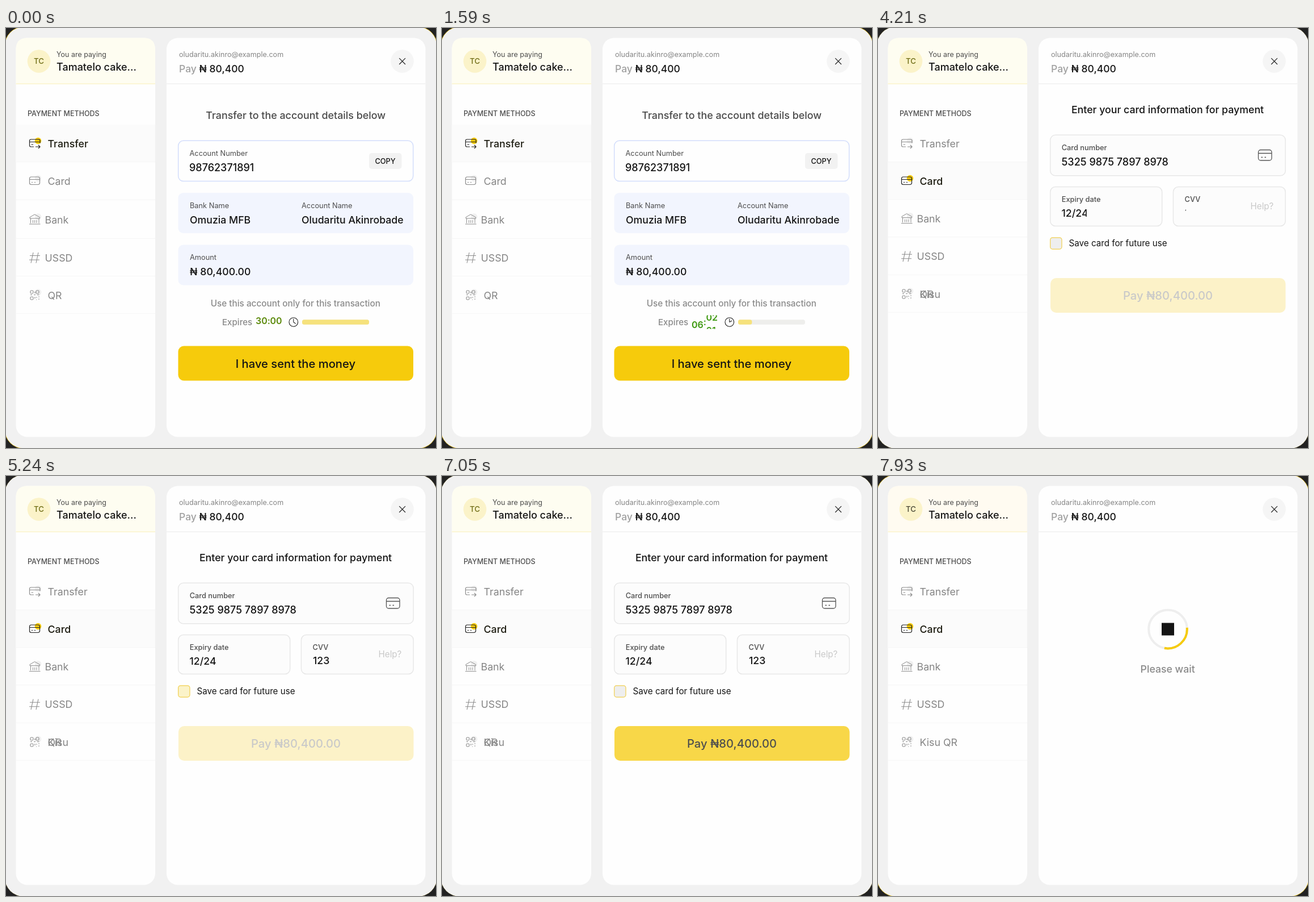
An HTML page for the animation above (8000 ms loop, 758 by 739 pixels).

```html
<!DOCTYPE html>
<html lang="en">
<head>
<meta charset="utf-8">
<title>Checkout</title>
<style>
html, body { margin: 0; width: 100%; height: 100%; overflow: hidden; background: #222; }
svg { display: block; width: 758px; height: 739px; font-family: Inter, sans-serif; }
</style>
</head>
<body>
<svg id="stage" viewBox="0 0 758 739"></svg>
<script>
const LOOP = 8000, CARD_AT = 3040, WAIT_AT = 7310;
const INK = '#141414', LABEL = '#4d4d4d', GREY = '#8a8a8a', YELLOW = '#f6cb0c', PITCH = 23.5;

const text = (x, y, str, size, fill, weight = 400, extra = '') =>
  `<text x="${x}" y="${y}" font-size="${size}" fill="${fill}" font-weight="${weight}" ${extra}>${str}</text>`;
const mid = (x, y, str, size, fill, weight, extra = '') =>
  text(x, y, str, size, fill, weight, `text-anchor="middle" ${extra}`);
const rect = (x, y, w, h, r, fill, extra = '') =>
  `<rect x="${x}" y="${y}" width="${w}" height="${h}" rx="${r}" fill="${fill}" ${extra}/>`;
const path = (d, stroke, width, extra = '') =>
  `<path d="${d}" fill="none" stroke="${stroke}" stroke-width="${width}" ${extra}/>`;
const circle = (x, y, r, fill, extra = '') => `<circle cx="${x}" cy="${y}" r="${r}" fill="${fill}" ${extra}/>`;
const outline = (color, width) => `stroke="${color}" stroke-width="${width}"`;
const group = (id, body) => `<g id="${id}">${body}</g>`;
const clip = (id, x, y, w, h) =>
  `<clipPath id="${id}"><rect id="${id}Box" x="${x}" y="${y}" width="${w}" height="${h}"/></clipPath>`;
const clipped = (id, body) => `<g clip-path="url(#${id})">${body}</g>`;
const line = (x1, x2, y, color, w = 1) => path(`M${x1} ${y}H${x2}`, color, w);

// Icons are drawn around their row's middle.
const icons = {
  Transfer: c => path('M49 5.5H44Q41.5 5.5 41.5 3V-5Q41.5 -7.5 44 -7.5H57.5Q60 -7.5 60 -5V-1M41.5 -3H60M44.5 1.5H48M52 5.5H60M57 2.5L60 5.5L57 8.5', c, 1.2),
  Card: c => rect(41.5, -7.5, 18, 13.5, 3, 'none', outline(c, 1.2)) +
    path('M41.5 -3H59.5M45 2H47M50 2H52', c, 1.2),
  Bank: c => path('M42 -4L50.5 -9L59.5 -4V-2H42ZM43.5 -2V6.5M47.5 1V6M50.7 1V6M54 1V6M58 -2V6.5M41 8H60.5', c, 1),
  USSD: c => path('M48 -9L44 9.5M57 -9L53 9.5M42 -3.5H60M41 4H59', c, 1.1),
  QR: c => [[43, -8], [53, -8], [43, 3]].map(([x, y]) =>
      rect(x, y, 5, 5, 1.5, 'none', outline(c, 1.1))).join('') +
    path('M43 -0.5H46M49 -0.5H52M55 -0.5H58.5M51 -6V-3M51 3V6M53 4H55M57 3H59M53 8H54M57 7H59', c, 1.1)
};

function row(name, y, active, label) {
  const x = name === 'Bank' || name === 'USSD' ? 68.5 : 73.5;
  const dot = name === 'USSD' ? '' : circle(56.5, -5, 5.8, active ? YELLOW : '#f0f0f0');
  return `<g transform="translate(0 ${y})">${dot}${icons[name](active ? '#222' : '#8c8c8c')}` +
    text(x, 6.7, label, 17.8, active ? '#1c1b10' : '#858585', active ? 500 : 400) + '</g>';
}

function menu(active, ys, lines, qr) {
  return rect(17.5, active === 'Transfer' ? 170 : 236, 245.5, 65.5, 0, '#fbfbfb') +
    lines.map(y => line(17.5, 263, y, '#f6f6f6')).join('') +
    Object.keys(icons).map((n, i) => row(n, ys[i], n === active, n === 'QR' ? qr : n)).join('');
}

const field = (x, y, w, h, label) =>
  rect(x, y, w, h, 9, '#fcfcfc', outline('#e8e8e8', 1.5)) +
  text(x + 20, y + 26.5, label, 12.8, LABEL, 500);

const pair = (x, y, label, value) =>
  text(x, y, label, 12.8, LABEL) + text(x, y + 27, value, 17.7, INK, 500);

const shell =
  rect(-2, -2, 761.5, 741.8, 33, '#f1f1f1', `id="frame" ${outline(YELLOW, 0.7)}`) +
  rect(17.5, 17.5, 245.5, 702, 20, '#fefefe') +
  '<path id="head" d="M17.5 98V37.5Q17.5 17.5 37.5 17.5H243Q263 17.5 263 37.5V98Z"/>' +
  line(17.5, 263, 98.2, '#fcf4cc', 1.5) +
  circle(58, 58.5, 20.3, '#fbf3c9') +
  mid(58, 63.3, 'TC', 13.3, '#6f6c14', 500, 'id="initials"') +
  text(89, 51, 'You are paying', 12.5, LABEL) +
  text(89, 75, 'Tamatelo cake...', 18, INK, 500) +
  text(38, 155, 'PAYMENT METHODS', 12.5, LABEL, 500) +
  rect(283, 17.5, 456.5, 702, 20, '#fefefe') +
  line(283, 739.5, 98.2, '#f1f1f1', 1.4) +
  text(305, 51, 'oludaritu.akinro@example.com', 12.6, '#858585') +
  text(305, 77.5, 'Pay', 17.5, '#a0a0a0', 500) +
  text(340.5, 77.5, '₦ 80,400', 17.5, INK, 500) +
  circle(698.5, 58.5, 20.3, '#f5f5f5') +
  path('M693.2 53.2L704 64M704 53.2L693.2 64', '#222', 1.2);

const transfer =
  rect(38, 237, 206, 63, 2, '#fcfcfc', 'id="hover"') +
  menu('Transfer', [203.5, 269.5, 337, 404, 470], [235.8, 302.3, 370.3, 436.5, 502.5], 'QR') +
  mid(510.7, 160, 'Transfer to the account details below', 17.9, '#4a4a4a', 500) +
  rect(303.7, 198.3, 414, 71.3, 9, '#fefefe', outline('#d3ddfb', 1.5)) +
  text(323.5, 225, 'Account Number', 12.8, LABEL) +
  text(323, 251.5, '98762371891', 18, INK, 500) +
  rect(640, 220, 57.5, 28, 5, '#f2f2f2') +
  mid(668.6, 239, 'COPY', 12.8, INK, 500) +
  rect(303.5, 290, 414.5, 71, 9, '#f2f5fe') +
  pair(324, 316.5, 'Bank Name', 'Omuzia MFB') +
  pair(521, 316.5, 'Account Name', 'Oludaritu Akinrobade') +
  rect(303.5, 381.5, 414.5, 71, 9, '#f2f5fe') +
  pair(324, 408.2, 'Amount', '₦ 80,400.00') +
  mid(510.3, 489.5, 'Use this account only for this transaction', 15.3, GREY, 500) +
  text(381, 522.5, 'Expires', 15.1, GREY, 500) +
  group('clock', clipped('digits', group('minutes', '') + group('seconds', '')) +
    text(460.7, 521, ':', 16, 'currentColor', 600, 'id="colon"')) +
  circle(506.8, 517.5, 7.8, '#fefefe', outline('#222', 1.1)) +
  path('M506.8 511.8V517.5', '#222', 1.1) +
  path('M506.8 517.5V512.5', '#222', 1.1, 'id="hand"') +
  rect(522, 513.2, 118, 8.6, 3.5, '#eeeeec') +
  rect(522, 513.2, 118, 8.6, 3.5, '#f6e27c', 'id="bar"') +
  rect(303.5, 559.5, 414.5, 61, 10, YELLOW) +
  mid(510.4, 597.7, 'I have sent the money', 20.2, INK, 500);

const cardRows = [203.5, 269.5, 335.7, 401.7, 468];
const cardLines = [235.8, 301.8, 367.8, 434.2, 500];

const card =
  menu('Card', cardRows, cardLines, 'QR') +
  text(73.5, 474.7, 'Kisu', 17.8, '#858585') +
  mid(510.5, 149.8, 'Enter your card information for payment', 17.75, INK, 500) +
  field(303.7, 188.3, 414.5, 71.5, 'Card number') +
  field(303.7, 279.5, 197, 69, 'Expiry date') +
  field(520.5, 279.5, 197.7, 69, 'CVV') +
  clipped('number', text(323.5, 241.5, '5325 9875 7897 8978', 18, INK, 500)) +
  clipped('expiry', text(323.5, 331.7, '12/24', 17.7, INK, 500)) +
  clipped('cvv', text(541, 330.7, '123', 17.7, INK, 500)) +
  rect(670.5, 214.5, 23.5, 18.5, 4, 'none', outline('#555', 1.3)) +
  path('M670.5 220.5H694M675.5 227.5H678M681.5 227.5H684', '#555', 1.3) +
  text(656.5, 319.2, 'Help?', 15.2, '#c9c9c9') +
  rect(303.7, 368.8, 20.3, 20.3, 4, '#eee', `id="check" ${outline('#f1cf50', 1.2)}`) +
  text(336.5, 384.2, 'Save card for future use', 15.2, INK) +
  group('pay', rect(304, 440, 414.5, 61, 10, YELLOW) + mid(511, 478, 'Pay ₦80,400.00', 20.2, INK, 500));

const wait =
  menu('Card', cardRows, cardLines, 'Kisu QR') +
  circle(511, 269.5, 33.8, 'none', outline('#eee', 4)) +
  path('M505.1 302.8A33.8 33.8 0 0 0 544.7 266.6', YELLOW, 4, 'id="arc"') +
  rect(500, 258.5, 22, 22, 0, INK) +
  mid(510.7, 346, 'Please wait', 17.7, GREY, 500);

const pages = { transfer, card, wait };
document.getElementById('stage').innerHTML =
  `<defs>${clip('digits', 438, 505.5, 50, 24)}${clip('number', 322, 224, 0, 24)}` +
  `${clip('expiry', 322, 314, 0, 24)}${clip('cvv', 540, 313, 0, 24)}</defs>` +
  shell + Object.entries(pages).map(([id, body]) => group(id, body)).join('');

const el = id => document.getElementById(id);
const set = (id, name, value) => el(id).setAttribute(name, value);
const ramp = (t, a, b) => Math.min(1, Math.max(0, (t - a) / (b - a)));
const two = n => String(n).padStart(2, '0');

// A column of numbers that slides upwards, one row per value.
function roll(id, x, total, p, base, label) {
  const pos = total * p, first = Math.floor(pos);
  const digit = i => text(x, base + (i - pos) * PITCH, label(total - i), 16, 'currentColor', 600);
  el(id).innerHTML = digit(first) + (first < total ? digit(first + 1) : '');
}

function drawTransfer(t) {
  const p = ramp(t, 200, 1954), base = t < 200 ? 521.3 : 523;
  set('clock', 'color', t < 200 ? '#5c8a0c' : '#3b980d');
  set('colon', 'y', base - 0.5);
  roll('minutes', 440, 30, p, base, two);
  roll('seconds', 465.5, 8, p, base, n => two(n % 8));
  set('bar', 'width', 118 * (1 - p));
  set('hand', 'transform', `rotate(${125 * (1 - p ** 2.78)} 506.8 517.5)`);
  set('hover', 'opacity', ramp(t, 2500, 2900));
}

function drawCard(t) {
  set('numberBox', 'width', 190 * ramp(t, 3200, 3780));
  set('expiryBox', 'width', 51 * ramp(t, 3700, 4270));
  set('cvvBox', 'width', 33 * ramp(t, 4160, 4770));
  set('check', 'fill', t >= 5240 && t < 6120 ? '#fbf3c9' : '#eee');
  set('pay', 'opacity', 0.22 + 0.78 * ramp(t, 5600, 5770) - 0.28 * ramp(t, 6790, 7080));
}

function draw(t) {
  const page = t < CARD_AT ? 'transfer' : t < WAIT_AT ? 'card' : 'wait';
  for (const id in pages) set(id, 'display', id === page ? 'inline' : 'none');
  set('head', 'fill', page === 'wait' ? '#fffbf1' : '#fefdf1');
  set('initials', 'fill', page === 'wait' ? '#4b4936' : '#6f6c14');
  set('frame', 'stroke-opacity', page === 'card' ? 0.2 : 1);
  if (page === 'transfer') drawTransfer(t);
  if (page === 'card') drawCard(t);
  if (page === 'wait') set('arc', 'transform', `rotate(${(t - 7930) * 0.36} 511 269.5)`);
}

const start = performance.now();
function tick() {
  draw((performance.now() - start) % LOOP);
  requestAnimationFrame(tick);
}
draw(0);
tick();
</script>
</body>
</html>
```
